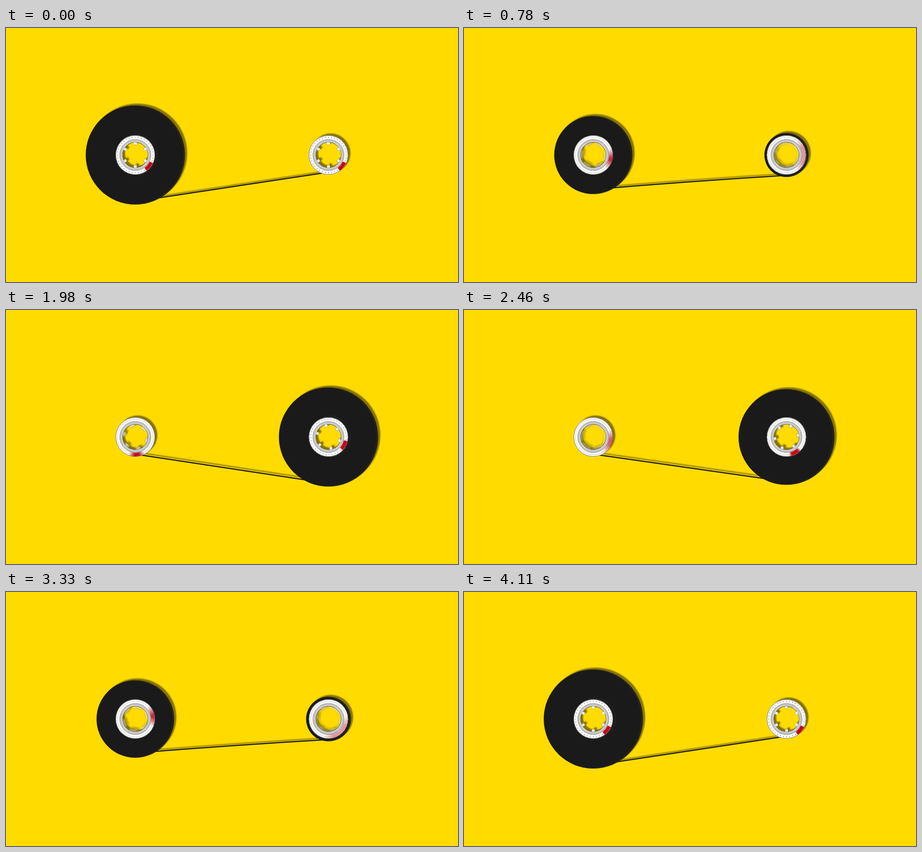
An HTML page with a canvas that plays this animation: 998 px wide and 561 px high, repeating every 4.14 s.

```html
<!DOCTYPE html>
<html lang="en">
<head>
<meta charset="utf-8">
<title>Tape reels</title>
<style>
  html, body { margin: 0; width: 100%; height: 100%; overflow: hidden; background: #ffdb00; }
  canvas { display: block; width: 100vw; height: 100vh; }
</style>
</head>
<body>
<canvas id="stage" width="998" height="561"></canvas>
<script>
const W = 998, H = 561, LOOP = 4140, STEP = 30, TURN = 2060;
const LEFT = 285.5, RIGHT = 712, CY = 280.5;
const R_MIN = 25.5, R_SPAN = 84, HUB = 43.5, HOLE = 28;
const SAMPLES = 17, SHUTTER = 30;
const TAU = Math.PI * 2, DEG = Math.PI / 180;

// time, then angle and speed (degrees, degrees per ms) of the left and right hub
const SPIN = [
  [0, 0, 0, 0, 0],
  [780, -386, -1.15, -1119, -2.6],
  [1410, -1649, -2.2, -2328, -0.85],
  [1980, -2474, -0.6, -2532, -0.15],
  [2060, -2520, 0, -2540, 0],
  [2850, -1349, 2.6, -2252, 1.05],
  [3330, -409, 1.15, -1071, 2.6],
  [4120, 0, 0, 0, 0]
];

const ctx = document.getElementById('stage').getContext('2d');
const makeLayer = (w, h) => {
  const c = document.createElement('canvas');
  c.width = w;
  c.height = h;
  return c.getContext('2d');
};
const scene = makeLayer(W, H);
const spinner = makeLayer(100, 100);

const clamp = (v, lo, hi) => Math.min(hi, Math.max(lo, v));

// Cubic Hermite through the spin table; col is 1 (left) or 3 (right).
function spinAt(t, col) {
  t = clamp(t, 0, 4120);
  let i = 0;
  while (i < SPIN.length - 2 && t > SPIN[i + 1][0]) i++;
  const a = SPIN[i], b = SPIN[i + 1];
  const h = b[0] - a[0], u = (t - a[0]) / h, v = 1 - u;
  return a[col] * (1 + 2 * u) * v * v + a[col + 1] * h * u * v * v
       + b[col] * u * u * (3 - 2 * u) - b[col + 1] * h * u * u * v;
}

// Sine ease from 0 to 1; the second half of the loop runs backwards.
function ease(t, from, length) {
  const p = t < TURN ? t : 2 * TURN - t;
  return (1 - Math.cos(Math.PI * clamp((p - from) / length, 0, 1))) / 2;
}

function ring(c, x, y, r, color, width) {
  c.beginPath();
  c.arc(x, y, r, 0, TAU);
  c.strokeStyle = color;
  c.lineWidth = width;
  c.stroke();
}

function annulus(c, x, y, outer, inner, color) {
  c.beginPath();
  c.arc(x, y, outer, 0, TAU);
  c.moveTo(x + inner, y);
  c.arc(x, y, inner, 0, TAU);
  c.fillStyle = color;
  c.fill('evenodd');
}

// Dots, red mark and teeth: everything that shows the rotation.
function drawMarks(c) {
  c.fillStyle = '#4a4a4a';
  for (let a = 0; a < 360; a += 10) {
    if (a > 20 && a < 60) continue;
    c.beginPath();
    c.arc(39.2 * Math.cos(a * DEG), 39.2 * Math.sin(a * DEG), 0.85, 0, TAU);
    c.fill();
  }
  c.beginPath();
  c.arc(0, 0, 42.6, 25 * DEG, 54 * DEG);
  c.arc(0, 0, 35.2, 54 * DEG, 25 * DEG, true);
  c.closePath();
  c.fillStyle = '#c9040c';
  c.fill();
  c.strokeStyle = '#5a1010';
  c.lineWidth = 0.6;
  c.stroke();
  c.fillStyle = '#fff';
  c.strokeStyle = '#555';
  c.lineWidth = 0.9;
  for (let k = 0; k < 6; k++) {
    c.save();
    c.rotate((30 + 60 * k) * DEG);
    c.fillRect(23, -2.6, 5.2, 5.2);
    c.strokeRect(23, -2.6, 5.2, 5.2);
    c.restore();
  }
}

// Average of several poses across the shutter time.
function blurMarks(t, col) {
  const c = spinner;
  c.setTransform(1, 0, 0, 1, 0, 0);
  c.clearRect(0, 0, 100, 100);
  c.globalCompositeOperation = 'lighter';
  c.globalAlpha = 1 / SAMPLES;
  for (let i = 0; i < SAMPLES; i++) {
    const dt = (i / (SAMPLES - 1) - 0.5) * SHUTTER;
    c.setTransform(1, 0, 0, 1, 50, 50);
    c.rotate(spinAt(t + dt, col) * DEG);
    drawMarks(c);
  }
}

function drawReel(x, radius, t, col) {
  const c = scene;
  if (radius > HUB) {
    annulus(c, x, CY, radius, HOLE, '#1a1a1a');
    c.save();
    c.beginPath();
    c.arc(x, CY, radius, 0, TAU);
    c.clip();
    ring(c, x - 2, CY, radius - 0.6, '#3a3a3a', 0.8);
    const groove = 45 * radius / 109.5;
    if (groove > HUB - 4) ring(c, x + 3.5, CY - 1, groove, '#303030', 0.8);
    c.restore();
  }
  annulus(c, x, CY, HUB, HOLE, '#fff');
  annulus(c, x, CY, 33.8, 31, '#c4c4c4');
  ring(c, x, CY, HUB - 0.5, '#6a6a6a', 1);
  ring(c, x, CY, 34.4, '#707070', 0.9);
  ring(c, x, CY, 30.8, '#8c8c8c', 0.7);
  ring(c, x, CY, HOLE + 0.4, '#5a5a5a', 1.1);
  blurMarks(t, col);
  c.drawImage(spinner.canvas, x - 50, CY - 50);
}

// The left end rises first, the right end sinks later, so the tape bows between.
function drawTape(t, wind) {
  const y0 = CY + 102.5 - 64.5 * ease(t, 216, 1270);
  const y1 = CY + 38 + 64.5 * ease(t, 482, 1397);
  const bow = 8 * Math.sin(Math.PI * wind) ** 2;
  scene.beginPath();
  scene.moveTo(LEFT, y0);
  scene.quadraticCurveTo((LEFT + RIGHT) / 2, (y0 + y1) / 2 - bow / 2, RIGHT, y1);
  scene.strokeStyle = '#1a1a1a';
  scene.lineWidth = 2.5;
  scene.stroke();
}

function draw(t) {
  const wind = ease(t, 178, 1710);
  scene.clearRect(0, 0, W, H);
  drawTape(t, wind);
  drawReel(LEFT, R_MIN + R_SPAN * (1 - wind), t, 1);
  drawReel(RIGHT, R_MIN + R_SPAN * wind, t, 3);

  ctx.fillStyle = '#ffdb00';
  ctx.fillRect(0, 0, W, H);
  ctx.save();
  ctx.shadowColor = 'rgba(0, 0, 0, 0.48)';
  ctx.shadowOffsetX = 5;
  ctx.shadowOffsetY = -4;
  ctx.shadowBlur = 2.5;
  ctx.drawImage(scene.canvas, 0, 0);
  ctx.restore();
}

const start = performance.now();
let shown = -1;
function tick() {
  const t = Math.floor(((performance.now() - start) % LOOP) / STEP) * STEP;
  if (t !== shown) draw(shown = t);
  requestAnimationFrame(tick);
}
tick();
</script>
</body>
</html>
```
